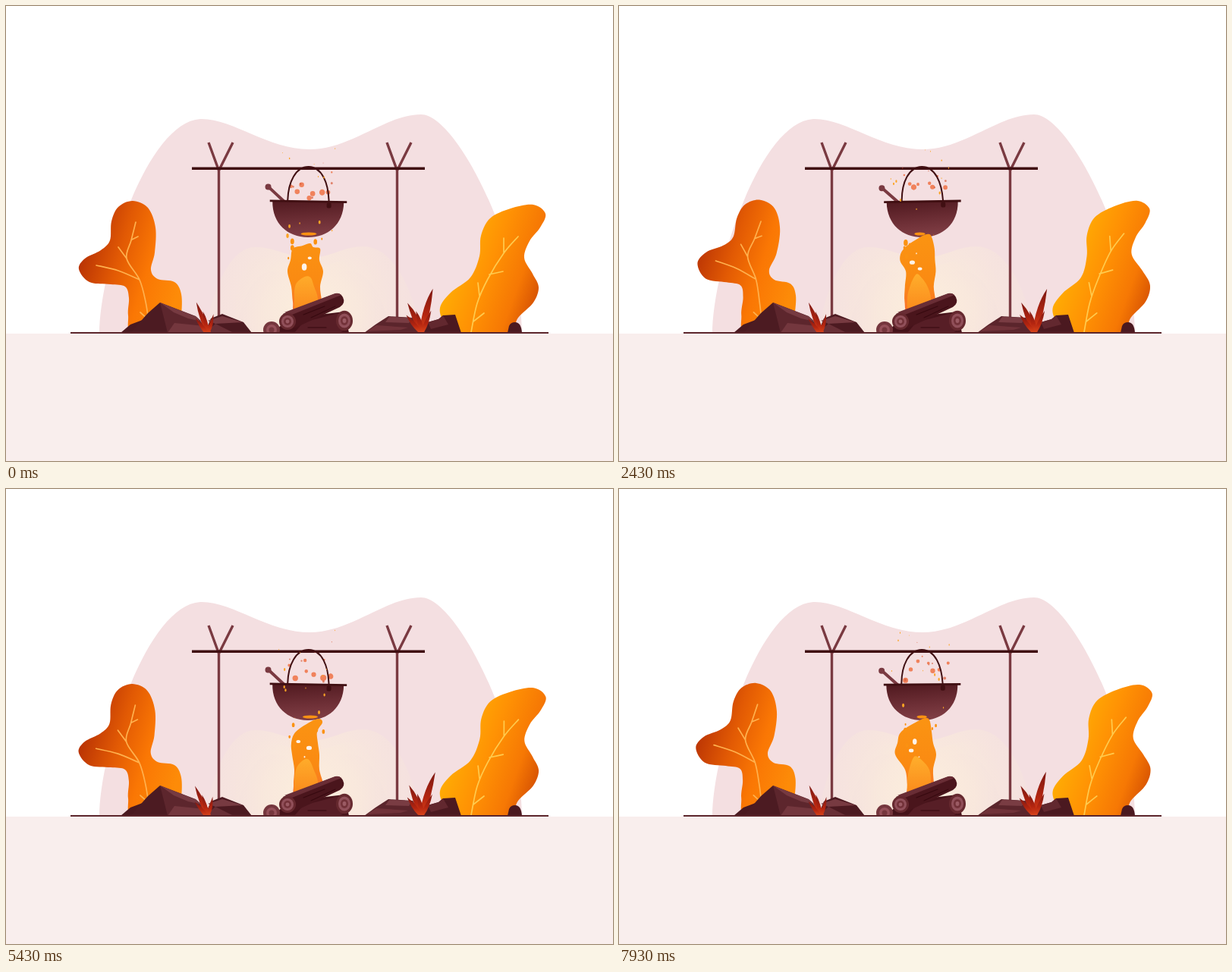
An HTML page that plays this animation: 800x600 px, repeating every 8000 ms.

```html
<!DOCTYPE html>
<html lang="en">
<head>
<meta charset="utf-8">
<title>Campfire</title>
<style>
  html, body { margin: 0; width: 100%; height: 100%; overflow: hidden; background: #fff; }
  svg { display: block; width: 100vw; height: 100vh; }
  .line { fill: none; stroke-linecap: round; stroke-linejoin: round; }
</style>
</head>
<body>
<svg viewBox="0 0 800 600" preserveAspectRatio="none">
  <defs>
    <linearGradient id="leafL" gradientUnits="userSpaceOnUse" x1="98" y1="335" x2="228" y2="375">
      <stop offset="0" stop-color="#b93304"/><stop offset=".35" stop-color="#e25a04"/>
      <stop offset=".65" stop-color="#fa7704"/><stop offset="1" stop-color="#fd8b08"/>
    </linearGradient>
    <linearGradient id="leafR" gradientUnits="userSpaceOnUse" x1="590" y1="345" x2="708" y2="388">
      <stop offset="0" stop-color="#ffab04"/><stop offset=".35" stop-color="#ff9204"/>
      <stop offset=".7" stop-color="#f67804"/><stop offset="1" stop-color="#cf4a02"/>
    </linearGradient>
    <linearGradient id="iron" x1="0" y1="0" x2=".15" y2="1">
      <stop offset="0" stop-color="#50191f"/><stop offset=".55" stop-color="#6b2d34"/><stop offset="1" stop-color="#7f3d44"/>
    </linearGradient>
    <linearGradient id="fire" gradientUnits="userSpaceOnUse" x1="0" y1="300" x2="0" y2="400">
      <stop offset="0" stop-color="#fb9412"/><stop offset=".65" stop-color="#fa8a12"/><stop offset="1" stop-color="#f9732c"/>
    </linearGradient>
    <linearGradient id="core" gradientUnits="userSpaceOnUse" x1="0" y1="350" x2="0" y2="402">
      <stop offset="0" stop-color="#ffb02c"/><stop offset="1" stop-color="#fb8a1c"/>
    </linearGradient>
    <linearGradient id="blade" x1="0" y1="0" x2="0" y2="1">
      <stop offset="0" stop-color="#7c1812"/><stop offset=".6" stop-color="#b42510"/><stop offset="1" stop-color="#d8431a"/>
    </linearGradient>
    <radialGradient id="glow" gradientUnits="userSpaceOnUse" cx="402" cy="395" r="150">
      <stop offset="0" stop-color="#fdf0dc"/><stop offset=".5" stop-color="#f9e9dc"/><stop offset="1" stop-color="#f4e0df"/>
    </radialGradient>
    <path id="mound" d="M262 432C275 360 300 318 328 318C357 318 372 332 400 332C428 332 445 317 470 317C510 317 535 370 548 432Z"/>
  </defs>

  <path fill="#f4dfe1" d="M123 432C123 350 185 150 258 149C300 149 345 189 400 189C455 189 500 143 547 143C595 143 680 320 680 432Z"/>
  <g fill="url(#glow)">
    <use href="#mound" opacity=".7"/>
    <use href="#mound" opacity=".5" transform="translate(405 432) scale(.87) translate(-405 -432)"/>
    <use href="#mound" opacity=".5" transform="translate(405 432) scale(.72) translate(-405 -432)"/>
  </g>

  <path id="bodyL" fill="url(#leafL)"/>
  <path id="veinL" class="line" stroke="#ffb14e" stroke-width="1.7"/>
  <path id="bodyR" fill="url(#leafR)"/>
  <path id="veinR" class="line" stroke="#ffcb4e" stroke-width="1.7"/>

  <g class="line" stroke="#7a3a41" stroke-width="3.4">
    <path style="stroke-linecap:butt" d="M280.5 216V412M267 180L280.5 217L299 180"/>
    <path style="stroke-linecap:butt" d="M515.5 216V412M502 180L515.5 217L534 180"/>
  </g>
  <path stroke="#400f12" stroke-width="3.6" d="M245 214.300H552"/>

  <!-- rocks -->
  <path fill="#4a1920" d="M151 431L164 420L180 414L215 431Z"/>
  <path fill="#4c1b22" d="M164 431L187 405L203 391L218 409L213 431Z"/>
  <path fill="#5d262d" d="M203 391L250 409L271 431H213Z"/>
  <path fill="#763a41" d="M203 391L251 410L258 416L240 412L221 404Z"/>
  <path fill="#74373e" d="M213 431L222 418L262 422L270 431Z"/>
  <path fill="#4c1a21" d="M262 431L270 412L285 406L313 417L324 431Z"/>
  <path fill="#773a41" d="M266 415L285 409L312 417L276 419Z"/>
  <path fill="#682f36" d="M262 431L276 419L300 431Z"/>
  <path fill="#5b252c" d="M472 431L487 420L504 409L536 411L548 431Z"/>
  <path fill="#793c43" d="M500 417L505 410L535 411L531 418Z"/>
  <path fill="#703239" d="M476 429L488 421L530 424L520 427Z"/>
  <path fill="#4b1920" d="M545 431L556 417L570 413L576 408L592 407L600 431Z"/>
  <path fill="#62282f" d="M556 417L570 413L576 408L583 420L560 426Z"/>
  <path fill="#4b1920" d="M661 431L663 422Q665 417 671 417Q679 417 680 431Z"/>

  <g fill="url(#blade)">
    <g id="grassL">
      <path d="M250 391Q262 408 270 430L263 431Q253 410 250 391Z"/>
      <path d="M259 403Q266 414 268 431H262Q260 416 259 403Z"/>
      <path d="M273 406Q274 421 268 431H263Q268 418 273 406Z"/>
      <path d="M249 412Q260 419 267 431H261Q254 422 249 412Z"/>
    </g>
    <g id="grassR">
      <path d="M564 373Q560 408 551 430H545Q549 395 564 373Z"/>
      <path d="M530 391Q545 407 551 430H544Q535 413 530 391Z"/>
      <path d="M541 402Q550 414 551 430H545Q542 417 541 402Z"/>
      <path d="M561 402Q558 420 551 430H546Q552 414 561 402Z"/>
      <path d="M528 407Q541 416 549 430H543Q533 420 528 407Z"/>
    </g>
  </g>

  <path id="bubbles" fill="#f0764a" opacity=".88"/>
  <path id="dots" fill="#d95f3c" opacity=".7"/>
  <g id="pot">
    <path class="line" stroke="#400f12" stroke-width="2" d="M372 258C372 232 382 212 399 212C416 212 426 232 426.500 262"/>
    <path class="line" stroke="#7a3a41" stroke-width="4" d="M347 240L367 258"/>
    <circle cx="346" cy="239.500" r="4" fill="#7a3a41"/>
    <path fill="url(#iron)" d="M352 258H446C446 288 425 305 399 305C373 305 352 288 352 258Z"/>
    <path stroke="#400f12" stroke-width="2.800" d="M348.500 257.800H450"/>
    <rect x="423.500" y="259" width="6" height="7" rx="2" fill="#400f12"/>
  </g>

  <path id="flame" fill="url(#fire)"/>
  <path id="inner" fill="url(#core)"/>
  <path id="holes" fill="#fdf3ea"/>
  <path id="drops" fill="#fb9212"/>
  <path id="sparks" fill="#fca424"/>

  <!-- logs -->
  <path fill="#451219" d="M352 431L372 412L446 403L452 431Z"/>
  <circle cx="350" cy="427" r="11" fill="#75363d"/>
  <circle cx="350" cy="427" r="7" fill="#955059"/>
  <circle cx="350" cy="427" r="3.500" fill="#75363d"/>
  <path fill="#571e26" d="M380 431L392 417L446 403V427L440 431Z"/>
  <path fill="#4a151c" d="M365 406L432 380Q440 377 444 384Q448 392 440 397L380 425Z"/>
  <path fill="#692d35" d="M367 404L431 380Q438 377 442 381L377 407Z"/>
  <path class="line" stroke="#36090f" stroke-width="1.200" d="M392 407L420 396M402 411L434 396M398 424H422"/>
  <g id="end">
    <circle cx="371" cy="416" r="11" fill="#66292f"/>
    <circle cx="371" cy="416" r="8" fill="#91505a"/>
    <circle cx="371" cy="416" r="5" fill="#733239"/>
    <circle cx="371" cy="416" r="2.400" fill="#9b5b64"/>
  </g>
  <use href="#end" transform="translate(446 415) scale(1 1.200) translate(-371 -416)"/>

  <rect y="432" width="800" height="168" fill="#f9eeed"/>
  <path stroke="#5c262c" stroke-width="1.800" d="M85 431H715"/>
</svg>
<script>
const LOOP = 8000, STEP = 100, SWAY = 6400, TAU = Math.PI * 2;
const el = {};
document.querySelectorAll('[id]').forEach(n => el[n.id] = n);

const frac = x => x - Math.floor(x);
const rnd = (i, salt) => frac(Math.sin(i * 12.9898 + salt * 78.233) * 43758.5453);
const mix = (a, b, u) => a + (b - a) * u;
const fix = n => n.toFixed(2);

// flat list of numbers -> points
const pairs = s => {
  const n = s.trim().split(/[\s,]+/).map(Number), out = [];
  for (let i = 0; i < n.length; i += 2) out.push([n[i], n[i + 1]]);
  return out;
};

const spline = (p, closed) => {
  const n = p.length;
  const at = i => closed ? p[(i + n) % n] : p[Math.max(0, Math.min(n - 1, i))];
  let d = 'M' + p[0].map(fix);
  for (let i = 0; i < (closed ? n : n - 1); i++) {
    const [a, b, c, e] = [at(i - 1), at(i), at(i + 1), at(i + 2)];
    const k1 = [0, 1].map(j => b[j] + (c[j] - a[j]) / 6);
    const k2 = [0, 1].map(j => c[j] - (e[j] - b[j]) / 6);
    d += 'C' + [...k1, ...k2, ...c].map(fix);
  }
  return d + (closed ? 'Z' : '');
};

const oval = (x, y, rx, ry) => rx < 0.3 ? '' :
  `M${fix(x - rx)} ${fix(y)}a${fix(rx)} ${fix(ry)} 0 1 0 ${fix(2 * rx)} 0a${fix(rx)} ${fix(ry)} 0 1 0 ${fix(-2 * rx)} 0`;

const many = (n, fn) => Array.from({ length: n }, (_, i) => fn(i)).join('');

const leaves = [
  { id: 'L', root: [188, 431], bend: 0.12,
    body: pairs('167 257 187 266 197 292 196 325 191 348 200 360 222 364 231 380 231 408 226 434 168 434 161 408 162 385 157 370 138 367 110 364 96 347 104 333 125 322 137 309 139 284 148 265'),
    veins: ['119 342 148 349 176 361', '171 285 165 309 159 333 176 361 184 390 188 416',
      '148 318 159 333', '174 304 166 308', '177 404 187 413'].map(pairs) },
  { id: 'R', root: [617, 431], bend: -0.08,
    body: pairs('711 274 695 262 665 267 638 280 626 303 624 330 612 358 586 378 572 398 578 418 596 434 660 434 675 411 695 391 702 371 694 353 683 332 690 310 704 292'),
    veins: ['675 304 656 326 635 360 621 392 613 430', '656 306 656 325', '655 350 637 354',
      '622 365 624 382', '630 405 616 416'].map(pairs) }
];

const bendBy = (leaf, k) => ([x, y]) => {
  const dx = x - leaf.root[0], dy = y - leaf.root[1];
  const a = k * Math.min(1, Math.pow(Math.max(0, -dy) / 100, 1.5));
  const c = Math.cos(a), s = Math.sin(a);
  return [leaf.root[0] + dx * c - dy * s, leaf.root[1] + dx * s + dy * c];
};

// flame poses: left and right edge at each row, then the tip
const rows = [390, 370, 350, 335, 320];
const times = [0, 1530, 3430, 4630, 5430, 7030, 7930];
const poses = [
  [378, 416, 376, 414, 371, 418, 375, 413, 378, 414, 397, 313],
  [375, 416, 377, 414, 368, 413, 371, 411, 376, 413, 400, 304],
  [376, 417, 377, 420, 384, 420, 374, 419, 376, 421, 404, 299],
  [378, 418, 379, 416, 373, 417, 373, 417, 384, 416, 402, 310],
  [379, 418, 380, 413, 377, 413, 376, 411, 382, 410, 409, 303],
  [378, 418, 376, 416, 368, 413, 369, 410, 373, 414, 386, 313],
  [380, 415, 377, 414, 364, 418, 367, 414, 372, 412, 402, 302]
];

function drawFlame(t) {
  let i = 0;
  while (i < times.length - 2 && t >= times[i + 1]) i++;
  const u = Math.min(1, (t - times[i]) / (times[i + 1] - times[i]));
  const p = poses[i].map((v, j) => mix(v, poses[i + 1][j], u));
  const wild = Math.sin(Math.PI * u);
  const wave = (y, s) => wild * (3 * Math.sin(TAU * (t / 620 + y / 48) + s) + 2 * Math.sin(TAU * (t / 370 + y / 27) + s * 2));
  const left = rows.map((y, r) => [p[2 * r] + wave(y, 0), y]);
  const right = rows.map((y, r) => [p[2 * r + 1] + wave(y, 2), y]);
  const tx = p[10] + wave(300, 1), ty = p[11] + wild * 5 * Math.sin(t / 130);
  el.flame.setAttribute('d', spline([[382, 406], ...left, [tx - 6, ty + 3], [tx + 4, ty],
    [tx + 8, ty + 5], ...right.reverse(), [414, 406]], true));

  const lick = s => 2.5 * Math.sin(t / 170 + s);
  el.inner.setAttribute('d', spline([[383, 404], [380, 385], [382 + lick(0), 367],
    [391 + lick(1), 355 + lick(2)], [401 + lick(3), 358], [408 + lick(4), 370], [411, 386], [408, 404]], true));

  el.holes.setAttribute('d', many(3, k => {
    const c = frac(t / 950 + k * 0.37), r = Math.sin(Math.PI * c);
    return oval(384 + k * 7 + lick(k), 356 - 32 * c, 3.6 * r, (k === 1 ? 5 : 2.6) * r);
  }));
  el.drops.setAttribute('d', many(7, k => {
    const c = frac(t / (700 + 90 * k) + rnd(k, 1)), side = k % 2 ? 1 : -1;
    const r = (1.5 + 3 * rnd(k, 4)) * Math.sin(Math.PI * c);
    return oval(397 + side * (13 + 10 * rnd(k, 2)) + 3 * Math.sin(c * 5 + k), 345 - 46 * c, r * 0.8, r * 1.25);
  }) + oval(399 + 3 * Math.sin(t / 210), 300.500, 7 + 4 * Math.sin(t / 290 + 1), 2));
}

function drawSparks(t) {
  el.sparks.setAttribute('d', many(11, k => {
    const c = frac(t / (1300 + 900 * rnd(k, 3)) + rnd(k, 5));
    const r = (0.7 + 1.1 * rnd(k, 6)) * (1 - c * 0.6);
    return oval(397 + (rnd(k, 7) - 0.5) * 74 + 6 * Math.sin(c * 6 + k), 310 - 125 * c, r, r * 1.7);
  }));
  const rise = (n, salt, size, height) => many(n, k => {
    const c = frac(t / (1100 + 800 * rnd(k, salt)) + rnd(k, salt + 1));
    const r = size * (0.6 + 0.5 * rnd(k, salt + 2)) * (1 - 0.75 * c);
    return oval(371 + 64 * frac(k * 0.618 + 0.08) + 3 * Math.sin(c * 7 + k), 255 - height * c, r, r);
  });
  el.bubbles.setAttribute('d', rise(8, 11, 5, 36));
  el.dots.setAttribute('d', rise(5, 21, 2, 54));
}

function draw(t) {
  const p = 0.5 - 0.5 * Math.cos(TAU * (t + 570) / SWAY);
  for (const leaf of leaves) {
    const move = bendBy(leaf, leaf.bend * (p - 0.076));
    el['body' + leaf.id].setAttribute('d', spline(leaf.body.map(move), true));
    el['vein' + leaf.id].setAttribute('d', leaf.veins.map(v => spline(v.map(move))).join(''));
  }
  el.pot.setAttribute('transform', `rotate(${fix(1.1 - 2 * p)} 399 212)`);
  const g = Math.cos(TAU * (t - 1500) / 3900);
  el.grassL.setAttribute('transform', `rotate(${fix(-1.5 * g)} 266 431)`);
  el.grassR.setAttribute('transform', `rotate(${fix(1.8 * g)} 548 430)`);
  drawFlame(t);
  drawSparks(t);
}

// poses are held for 100 ms each
let shown = -1;
function tick(now) {
  const t = now % LOOP;
  const held = Math.max(0, Math.floor((t - 30) / STEP) * STEP + 30);
  if (held !== shown) draw(shown = held);
  requestAnimationFrame(tick);
}
draw(0);
requestAnimationFrame(tick);
</script>
</body>
</html>
```
